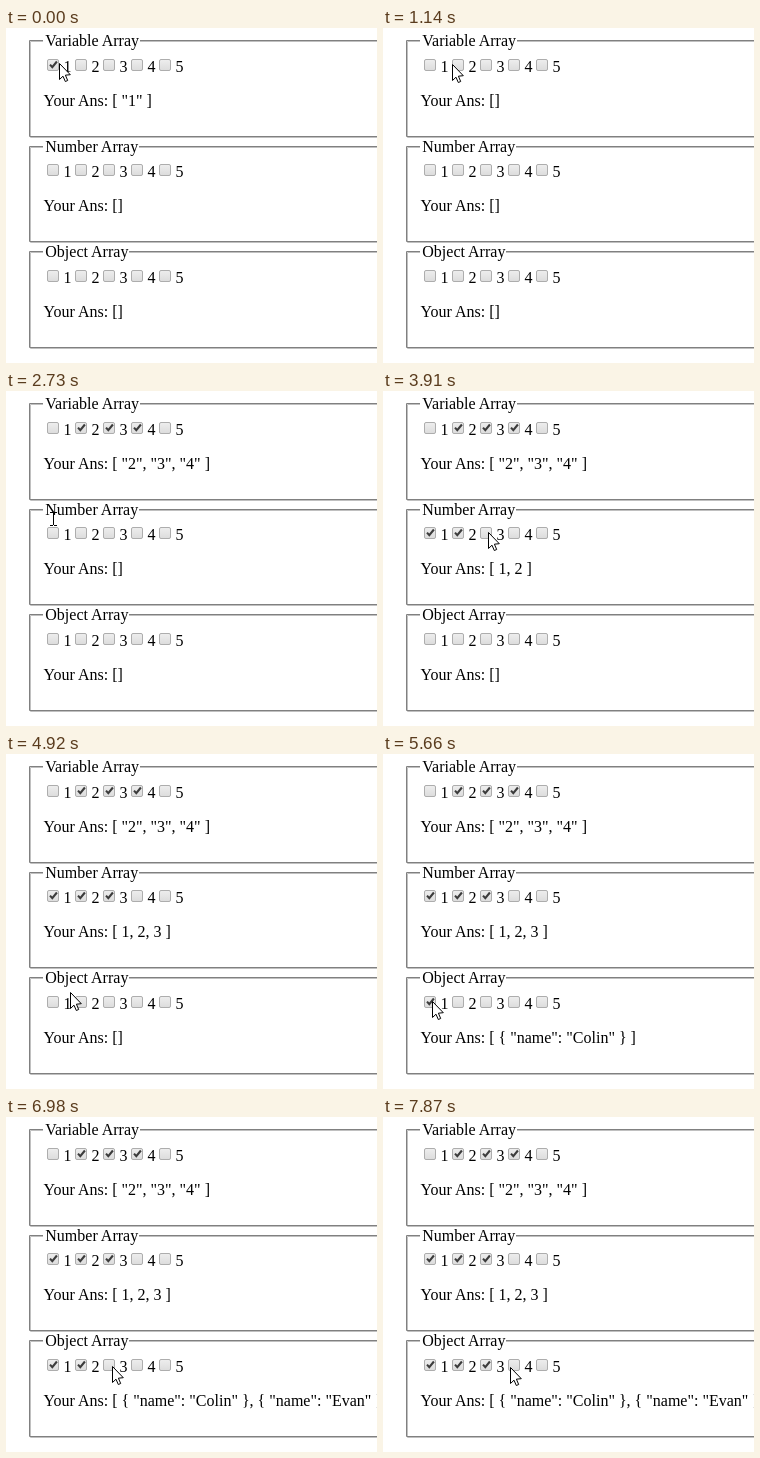
An HTML page that plays this animation: 371 px wide and 335 px high, repeating every 8 s.

```html
<!DOCTYPE html>
<html lang="en">
<head>
<meta charset="utf-8">
<title>Checkbox arrays</title>
<style>
html, body { margin: 0; width: 371px; height: 335px; overflow: hidden; background: #fff; }
svg { display: block; }
text { font: 16px "Liberation Serif", "Times New Roman", serif; fill: #000; }
</style>
</head>
<body>
<svg id="stage" width="371" height="335" viewBox="0 0 371 335">
  <defs>
    <linearGradient id="face" x2="0" y2="1">
      <stop offset="0" stop-color="#eee"/>
      <stop offset="1" stop-color="#dcdcdc"/>
    </linearGradient>
  </defs>
</svg>
<script>
const LOOP = 8000;
const STEP = 145;       // the pointer is redrawn at this interval
const STEP_START = 260;
const PITCH = 105.5;    // height of one group
const GAP = 28;         // distance between boxes
const boxes = [0, 1, 2, 3, 4];
const stage = document.getElementById('stage');

const quote = v => `"${v}"`;
const names = ['Colin', 'Evan', 'Mason', 'Peter', 'Wanda'];
const groups = [
  { title: 'Variable Array', show: i => quote(i + 1) },
  { title: 'Number Array', show: i => i + 1 },
  { title: 'Object Array', show: i => `{ "name": ${quote(names[i])} }` }
];

// The pointer arrives at x, y, waits there and flips the box under it on a click.
const stops = [
  { at: 0, x: 53, y: 35, click: 430 },
  { at: 860, x: 53, y: 35 },
  { at: 1280, x: 75, y: 36, click: 1430 },
  { at: 1850, x: 103, y: 36, click: 1870 },
  { at: 2290, x: 131, y: 36, click: 2310 },
  { at: 2725, x: 47, y: 128 },
  { at: 3030, x: 47, y: 138, click: 3190 },
  { at: 3600, x: 75, y: 140, click: 3620 },
  { at: 3880, x: 105, y: 141, click: 4340 },
  { at: 4900, x: 64, y: 238 },
  { at: 5200, x: 47, y: 247, click: 5510 },
  { at: 6200, x: 76, y: 248, click: 6250 },
  { at: 6950, x: 106, y: 249, click: 7280 },
  { at: 7800, x: 127, y: 250 }
];

function add(parent, tag, attrs, content) {
  const el = document.createElementNS('http://www.w3.org/2000/svg', tag);
  for (const key in attrs) el.setAttribute(key, attrs[key]);
  if (content !== undefined) el.textContent = content;
  return parent.appendChild(el);
}

function addBox(parent, i) {
  const x = 41 + GAP * i;
  add(parent, 'rect', { x: x + .5, y: 31.5, width: 11, height: 11, rx: 1.5,
    fill: 'url(#face)', stroke: '#adadad' });
  add(parent, 'text', { x: x + 16.5, y: 43.5 }, i + 1);
  return add(parent, 'path', { d: `M${x + 3} 36.6l2.3 2.5l4.6-5.6`,
    fill: 'none', stroke: '#3c3c3c', 'stroke-width': 2.1 });
}

groups.forEach((group, n) => {
  const bodyY = Math.floor(PITCH * n);
  const titleY = 18 + Math.round(PITCH * n);
  const title = add(stage, 'text', { x: 39.3, y: titleY }, group.title);
  group.titleMid = titleY - 5;
  group.titleEnd = Math.round(40 + title.getComputedTextLength());

  // groove border: a light line just inside a dark one
  ['#c0c0c0', '#808080'].forEach((stroke, dark) => {
    const left = 24.5 - dark, top = titleY - 4.5 - dark, bottom = bodyY + 109.5 - dark;
    add(stage, 'path', { fill: 'none', stroke,
      d: `M37 ${top}H${left}V${bottom}H371M${group.titleEnd} ${top}H371` });
  });

  const body = add(stage, 'g', { transform: `translate(0 ${bodyY})` });
  group.marks = boxes.map(i => addBox(body, i));
  group.answer = add(body, 'text', { x: 37.5, y: 78 });
});

const arrow = add(stage, 'path', {
  d: 'M.5 .5V16.5L4 13.2L6.3 18.5L8.7 17.5L6.4 12.2L11.3 11.7Z',
  fill: '#fff', stroke: '#000' });
const beam = add(stage, 'path', {
  d: 'M-3 -6.5H0M1 -6.5H4M.5 -6V6M-3 6.5H0M1 6.5H4',
  fill: 'none', stroke: '#000' });

const show = (el, on) => el.setAttribute('visibility', on ? 'visible' : 'hidden');

function drawGroups(t) {
  const on = groups.map(() => boxes.map(() => false));
  on[0][0] = true;
  for (const { x, y, click } of stops) {
    if (!(t >= click)) continue;
    const row = on[Math.floor(y / PITCH)];
    const i = Math.round((x - 47) / GAP);
    row[i] = !row[i];
  }
  groups.forEach((group, n) => {
    group.marks.forEach((mark, i) => show(mark, on[n][i]));
    const items = boxes.filter(i => on[n][i]).map(group.show);
    const label = `Your Ans: ${items.length ? `[ ${items.join(', ')} ]` : '[]'}`;
    if (group.answer.textContent !== label) group.answer.textContent = label;
  });
}

function pointerAt(t) {
  const next = stops.findIndex(s => s.at > t);
  if (next < 0) return stops[stops.length - 1];
  const a = stops[next - 1], b = stops[next];
  const leave = a.click || a.at;
  const p = Math.max(0, (t - leave) / (b.at - leave));
  const ease = p * p * (3 - 2 * p);
  const mix = key => Math.round(a[key] + (b[key] - a[key]) * ease);
  return { x: mix('x'), y: mix('y') };
}

function drawPointer(t) {
  const snapped = STEP_START + Math.floor((t - STEP_START) / STEP) * STEP;
  const { x, y } = pointerAt(Math.max(0, snapped));
  const overTitle = groups.some(g => Math.abs(y - g.titleMid) <= 9 && x < g.titleEnd);
  show(arrow, !overTitle);
  show(beam, overTitle);
  for (const el of [arrow, beam]) el.setAttribute('transform', `translate(${x} ${y})`);
}

const start = performance.now();
function tick() {
  const t = (performance.now() - start) % LOOP;
  drawGroups(t);
  drawPointer(t);
  requestAnimationFrame(tick);
}
tick();
</script>
</body>
</html>
```
